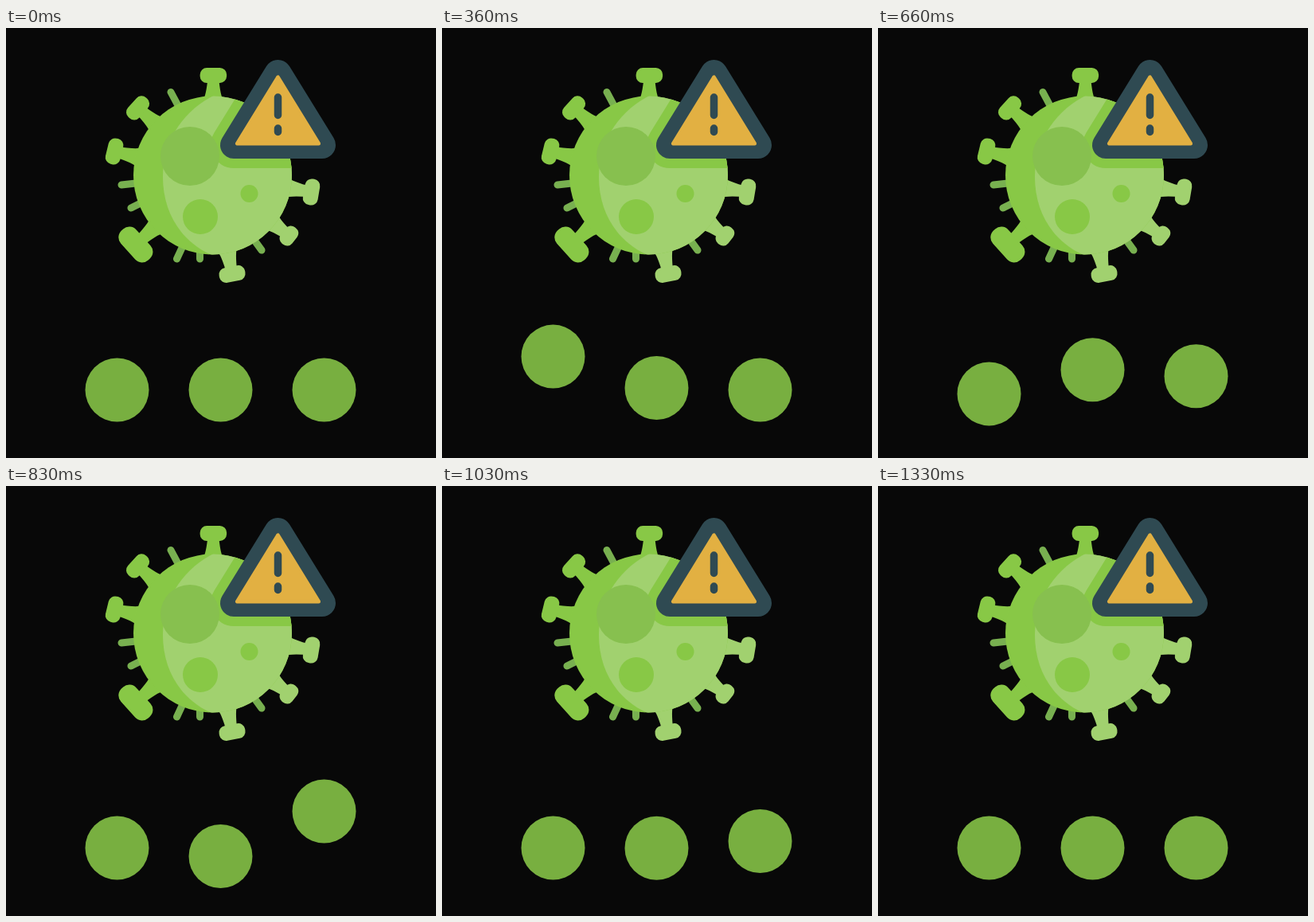
Recreate the animation shown at these times as an HTML page. Size 540x540 px, loop 1530 ms.

```html
<!DOCTYPE html>
<html lang="en">
<head>
<meta charset="utf-8">
<title>Virus alert loader</title>
<style>
  html, body { margin: 0; height: 100%; overflow: hidden; background: #080808; }
  svg { display: block; width: 100vw; height: 100vh; }
</style>
</head>
<body>
<svg viewBox="0 0 540 540">
  <defs>
    <clipPath id="body"><circle cx="259.5" cy="185" r="99.5"/></clipPath>
    <path id="sign" d="M341.5 57 L286 147 H397 Z" stroke-linejoin="round"/>
  </defs>
  <path d="M207 80.500l8 15M145 197l18-2M157 226l14-7M221 276l-6.500 14M243.500 280v10M313 268l8 11"
        stroke="#78b050" stroke-width="9" stroke-linecap="round"/>
  <g id="spikes"></g>
  <circle cx="259.5" cy="185" r="99.5" fill="#88c846"/>
  <g clip-path="url(#body)">
    <path d="M272 80C225 98 197 140 197 187C197 232 220 268 258 285H370V80Z" fill="#a1d16f"/>
    <use href="#sign" fill="#88c846" stroke="#88c846" stroke-width="58"/>
  </g>
  <circle cx="231" cy="161" r="37" fill="#87c04f"/>
  <g fill="#88c846">
    <circle cx="244" cy="237" r="22"/>
    <circle cx="305.500" cy="208" r="11"/>
  </g>
  <use href="#sign" fill="#2f4a52" stroke="#2f4a52" stroke-width="34"/>
  <path d="M341.500 62L290.500 145H392.500Z" fill="#e2b042" stroke="#e2b042" stroke-width="5" stroke-linejoin="round"/>
  <path d="M341.500 87v22.500M341.500 126v4.500" stroke="#2f4a52" stroke-width="9.500" stroke-linecap="round"/>
  <g id="dots" fill="#78af40"></g>
</svg>
<script>
const LOOP = 1530, FLOOR = 454.5, DARK = '#88c846', LIGHT = '#a1d16f';

// angle from the top, distance of the head, head length and thickness
const spike = (angle, dist, length, thick, color) => `
  <g transform="translate(259.5 185) rotate(${angle})" fill="${color}">
    <path d="M-13 -95Q-9 -98 -6.500 ${-dist}H6.500Q9 -98 13 -95Z"/>
    <rect x="${-length / 2}" y="${-dist - thick / 2}" width="${length}" height="${thick}" rx="${thick * 0.45}"/>
  </g>`;
document.getElementById('spikes').innerHTML = [
  spike(0.4, 125.5, 33.5, 19, DARK),
  spike(-48, 126.4, 33, 19, DARK),
  spike(-76.3, 127, 33, 19, DARK),
  spike(-132, 130, 50, 26, DARK),
  spike(168.8, 126.4, 33, 19, LIGHT),
  spike(99.6, 125.8, 33, 19, LIGHT),
  spike(128.4, 122.4, 26, 18, LIGHT)
].join('');

// times are in 1/30 s
const hops = [
  { start: 2.7, top: 10.2, dip: 18.1, end: 25, height: 45.5, depth: 11 },
  { start: 10.6, top: 17.2, dip: 25, end: 32.5, height: 40, depth: 10.5 },
  { start: 17, top: 25.1, dip: 33.5, end: 40, height: 46.5, depth: 11.5 }
];
const dotGroup = document.getElementById('dots');
dotGroup.innerHTML = hops.map((_, i) => `<circle cx="${139.5 + 130 * i}" cy="${FLOOR}" r="40"/>`).join('');

function offset({ start, top, dip, end, height, depth }, f) {
  if (f <= start || f >= end) return 0;
  if (f < top) return -height * (f - start) / (top - start);
  if (f < dip) return -height + (height + depth) * ((f - top) / (dip - top)) ** 1.2;
  return depth * ((end - f) / (end - dip)) ** 2.5;
}

function draw() {
  const step = Math.floor((performance.now() % LOOP) * 0.03 + 0.25);
  hops.forEach((hop, i) => dotGroup.children[i].setAttribute('cy', FLOOR + offset(hop, step)));
  requestAnimationFrame(draw);
}
draw();
</script>
</body>
</html>
```
